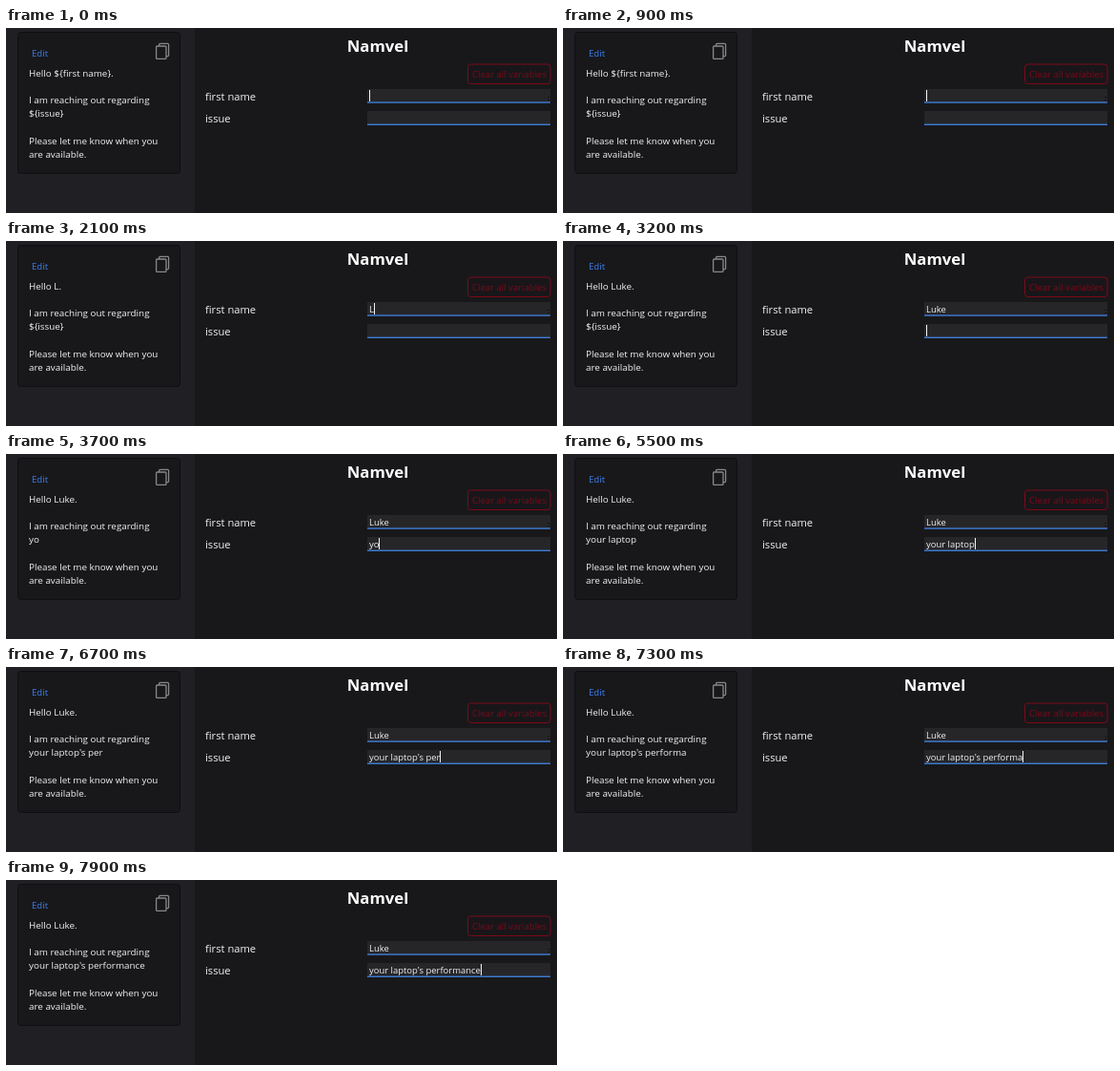
Recreate the animation shown at these times as an HTML page. Size 578x194 px, loop 8 s.

```html
<!DOCTYPE html>
<html lang="en">
<head>
<meta charset="utf-8">
<title>Message template</title>
<style>
  html, body { margin: 0; width: 100%; height: 100%; overflow: hidden; background: #18181a; }
  svg { display: block; width: 578px; height: 194px; font-family: "Open Sans", "Noto Sans", sans-serif; }
  text { fill: #f2f2f3; white-space: pre; }
  .card text { font-size: 9.86px; }
  .label { font-size: 11.2px; }
  .value { font-size: 9.45px; }
  .title { font-size: 16.7px; font-weight: 700; text-anchor: middle; fill: #fff; }
  .card .edit { font-size: 9.6px; fill: #3c80ee; }
  .clear { font-size: 9.55px; fill: #7c0a18; }
  .field { fill: #262629; }
  .line { fill: #3f7bd6; }
</style>
</head>
<body>
<svg viewBox="0 0 578 194">
  <rect width="578" height="194" fill="#18181a"/>
  <rect width="198" height="194" fill="#1f1f24"/>

  <g class="card">
    <rect x="12.5" y="4.5" width="170" height="148" rx="3" fill="#18181b" stroke="#0f0f12"/>
    <text class="edit" x="27" y="29.7">Edit</text>
    <g fill="none" stroke="#88888c" stroke-width="1.3" stroke-linejoin="round">
      <path d="M160.6 19V17.4a1 1 0 0 1 1-1H169.6a1 1 0 0 1 1 1V28.6a1 1 0 0 1-1 1H168"/>
      <rect x="157.6" y="19" width="10.4" height="13.4" rx="1"/>
    </g>
    <text id="greeting" x="24" y="50.6"></text>
    <text x="24" y="79.2">I am reaching out regarding</text>
    <text id="topic" x="24" y="93.4"></text>
    <text x="24" y="122">Please let me know when you</text>
    <text x="24" y="136.2">are available.</text>
  </g>

  <text class="title" x="390" y="24.7">Namvel</text>
  <rect x="484.5" y="38" width="86.5" height="20.5" rx="3" fill="#19161a" stroke="#7c0a18"/>
  <text class="clear" x="489" y="51.8">Clear all variables</text>

  <text class="label" x="209" y="76.2">first name</text>
  <text class="label" x="209" y="99.4">issue</text>

  <rect class="field" x="379" y="64" width="192" height="14"/>
  <rect class="line" x="379" y="77.4" width="192" height="1.4"/>
  <path d="M568.5 72.5h1.5M568.5 75.5h1.5" stroke="#0c0c0e"/>
  <rect class="field" x="379" y="87" width="192" height="14"/>
  <rect class="line" x="379" y="100.6" width="192" height="1.4"/>
  <text class="value" id="name" x="381" y="74.5"></text>
  <text class="value" id="issue" x="381" y="97.6"></text>
  <rect id="caret" width="1" height="12" fill="#f4f4f5"/>
</svg>

<script>
const LOOP = 8000;
const NAME = "Luke";
const ISSUE = "your laptop's performance";

// One time per typed character
const nameKeys = [2100, 2500, 2600, 2800];
const issueKeys = [
  3600, 3700, 3900, 4000, 4100,
  4300, 4400, 4700, 4800, 4900, 5000, 5900, 6100, 6300,
  6400, 6500, 6700, 6800, 6900, 7000, 7200, 7300, 7400, 7500, 7600
];
const FOCUS_ISSUE = 3000;
const BLINK = 530;
// Every key press or change of focus restarts the blink
const resets = [-430, ...nameKeys, FOCUS_ISSUE, ...issueKeys];

const el = id => document.getElementById(id);
const [greeting, topic, nameBox, issueBox, caret] =
  ["greeting", "topic", "name", "issue", "caret"].map(el);

const typed = (text, keys, t) => text.slice(0, keys.filter(k => k <= t).length);

function setText(node, text) {
  if (node.textContent !== text) node.textContent = text;
}

function draw(t) {
  const name = typed(NAME, nameKeys, t);
  const issue = typed(ISSUE, issueKeys, t);
  setText(nameBox, name);
  setText(issueBox, issue);
  setText(greeting, `Hello ${name || "${first name}"}.`);
  setText(topic, issue || "${issue}");

  const second = t >= FOCUS_ISSUE;
  const box = second ? issueBox : nameBox;
  const width = box.textContent ? box.getComputedTextLength() : 0;
  const last = resets.filter(k => k <= t).pop();
  caret.setAttribute("x", Math.round(381 + width));
  caret.setAttribute("y", second ? 88 : 65);
  caret.setAttribute("opacity", Math.floor((t - last) / BLINK) % 2 ? 0 : 1);
}

const start = performance.now();
function tick() {
  draw((performance.now() - start) % LOOP);
  requestAnimationFrame(tick);
}
draw(0);
requestAnimationFrame(tick);
</script>
</body>
</html>
```
